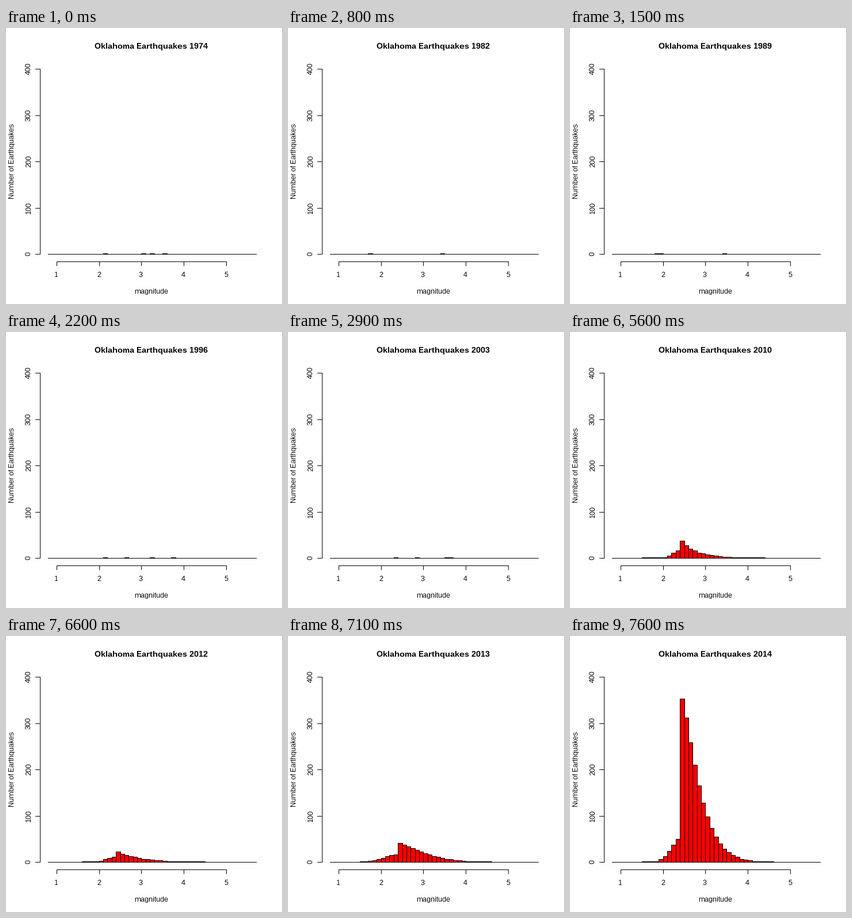
Recreate the animation shown at these times as a matplotlib script. Size 480 by 480 pixels, loop 8100 ms.

```python
import numpy as np
import matplotlib.pyplot as plt
from matplotlib.animation import FuncAnimation
from matplotlib.patches import Rectangle

plt.rcParams.update({
    "font.family": "Liberation Sans",
    "font.size": 12,
    "text.hinting": "native",
    "text.hinting_factor": 1,
})

SIZE, DPI = 480, 72
BINS = 49
X0, BIN_W = 73.51, 7.3833        # left edge of the first bin, bin width
Y0, PER_QUAKE = 393.69, 0.80445  # baseline, pixels per earthquake
BASE = int(Y0)
PEAK_BIN = 16                    # magnitude 2.4 to 2.5

# Busy years: first bin, strongest bin, then the curve as
# (height, width, power) below the peak and from the peak up.
SWARMS = {
    2008: (14, 22, (1, 5, 2), (3, 1, 0.5)),
    2009: (9, 29, (5, 3, 2), (8, 4, 1)),
    2010: (7, 35, (20, 2.5, 2), (38, 3.44, 0.85)),
    2011: (5, 47, (22, 3, 2), (42, 5, 1)),
    2012: (8, 33, (12, 3.5, 2), (22, 5.5, 1)),
    2013: (7, 36, (18, 5, 2), (41, 7.2, 1.35)),
    2014: (7, 35, (55, 3.3, 2), (353, 4.95, 1.3)),
}


def decay(dist, height, width, power):
    return np.round(height * np.exp(-(dist / width) ** power))


def counts(year):
    """Earthquakes in each magnitude bin."""
    n = np.zeros(BINS)
    if year in SWARMS:
        first, strongest, low, high = SWARMS[year]
        rise = np.arange(first, PEAK_BIN)
        n[rise] = np.maximum(1, decay(PEAK_BIN - rise, *low))
        n[PEAK_BIN:] = decay(np.arange(BINS - PEAK_BIN), *high)
        n[strongest] = max(1, n[strongest])
    else:
        rng = np.random.default_rng(year)
        n[rng.integers(9, 30, rng.integers(1, 5))] = 1
    return n


def year_at(i):
    """One year per step up to 2005, then five steps per year."""
    return 1974 + min(i, 31) + max(0, (i - 31) // 5)


fig = plt.figure(figsize=(SIZE / DPI, SIZE / DPI), dpi=DPI, facecolor="white")
ax = fig.add_axes([0, 0, 1, 1])
ax.set(xlim=(0, SIZE), ylim=(SIZE, 0))
ax.axis("off")


def box(x0, y0, x1, y1, color="black"):
    """Fill whole pixels, both corners included."""
    return ax.add_patch(Rectangle((x0, y0), x1 - x0 + 1, y1 - y0 + 1,
                                  fc=color, lw=0, antialiased=False))


def label(x, y, text, **kw):
    return ax.text(x, y, text, ha="center", va="baseline",
                   rotation_mode="anchor", **kw)


# Axes
box(88, 406, 383, 406)
for m in range(1, 6):
    x = int(X0 + (m - 0.8) * 10 * BIN_W)
    box(x, 406, x, 413)
    label(x - 0.5, 433, str(m))

box(59, 71, 59, BASE)
for v in range(0, 401, 100):
    y = int(Y0 - v * PER_QUAKE)
    box(51, y, 59, y)
    label(43, y - 0.5, str(v), rotation=90)

label(253, 462, "magnitude")
label(14, 231.8, "Number of Earthquakes", rotation=90)
title = label(253, 36, "", size=14.4, weight="bold")

# Bars: a black frame with a red inside
edges = (X0 + BIN_W * np.arange(BINS + 1)).astype(int)
spans = list(zip(edges, edges[1:]))
frames = [box(a, BASE, b, BASE) for a, b in spans]
fills = [box(a + 1, BASE, b - 1, BASE - 1, "red") for a, b in spans]


def update(i):
    year = year_at(i)
    title.set_text(f"Oklahoma Earthquakes {year}")
    for n, frame, fill in zip(counts(year), frames, fills):
        top = int(Y0 - n * PER_QUAKE)
        frame.set_y(top)
        frame.set_height(BASE - top + 1)
        fill.set_y(top + 1)
        fill.set_height(max(0, BASE - top - 1))
        fill.set_visible(BASE - top > 1)
    return [title, *frames, *fills]


anim = FuncAnimation(fig, update, frames=81, interval=100, repeat=True,
                     repeat_delay=0, blit=False)
plt.show()
```
